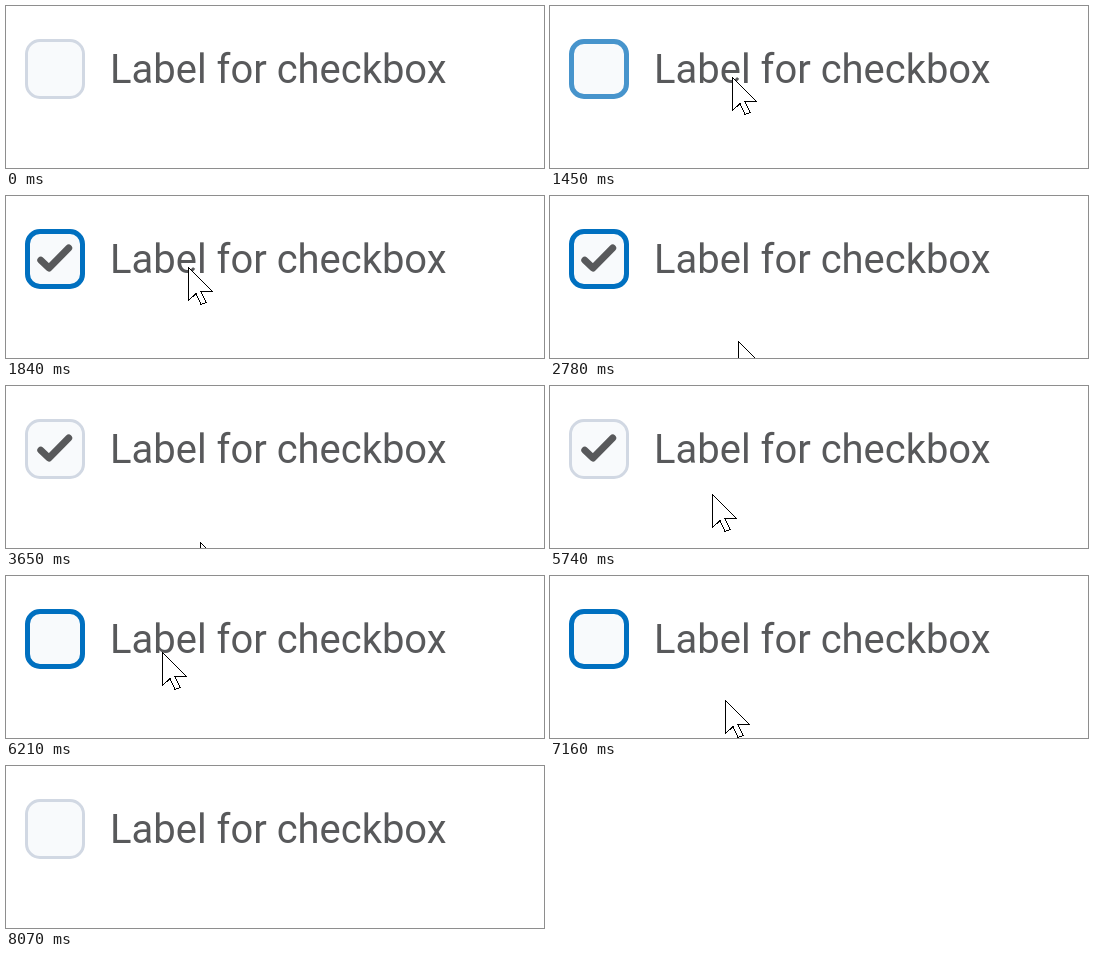
An HTML page that plays this animation: 538x162 px, repeating every 9860 ms.

```html
<!DOCTYPE html>
<html lang="en">
<head>
<meta charset="utf-8">
<title>Checkbox with label</title>
<style>
  html, body { margin: 0; width: 100%; height: 100%; overflow: hidden; background: #fff; }
  svg { display: block; }
  text { font: 39.95px Roboto, sans-serif; fill: #58595b; }
  #check { fill: none; stroke: #58595b; stroke-width: 7; stroke-linecap: round; stroke-linejoin: round; }
  #cursor { fill: #fff; stroke: #000; shape-rendering: crispEdges; }
</style>
</head>
<body>
<svg width="538" height="162" viewBox="0 0 538 162">
  <rect id="box" fill="#f8fafc"/>
  <path id="check" d="M34.8 64.2L43 72L62.7 52"/>
  <text x="104.1" y="77">Label for checkbox</text>
  <path id="cursor" d="M.5.5V33.5L8 26.5L13 37.5L18 35.5L13 24.5H24.5Z"/>
</svg>
<script>
const LOOP = 9860, FADE = 300;
const STEP = 1000 / 13, PHASE = 1070; // the picture advances 13 times a second
const GREY = [209, 216, 227], BLUE = [0, 112, 192], RADIUS = 15;
const [box, check, cursor] = ['box', 'check', 'cursor'].map(id => document.getElementById(id));

// Pointer glides; power is the ease-out strength along x and y
const glides = [
  { start: 1070, end: 1400, from: [219, 146], to: [182, 71], power: [1, 2] },
  { start: 2500, end: 2910, from: [182, 71], to: [194, 156], power: [0.7, 2] },
  { start: 5450, end: 5830, from: [196, 159], to: [156, 76], power: [2, 1] },
  { start: 6740, end: 7220, from: [156, 76], to: [179, 138], power: [1, 0.8] },
  { start: 7545, end: 7700, from: [179, 140], to: [179, 163], power: [1, 1] }
];
const visible = [[1070, 3950], [5450, 7700]];
const hovered = [[1330, 3300], [5690, 7745]];
const checked = [[1840, 6210]];

const mix = (a, b, p) => Math.round(a + (b - a) * p);
const progress = (t, start, end) => Math.min(1, Math.max(0, (t - start) / (end - start)));
const easeOut = (p, power) => 1 - (1 - p) ** power;
const within = (spans, t) => spans.some(([on, off]) => t >= on && t < off);
const snap = t => PHASE + Math.floor((t - PHASE) / STEP + 0.1) * STEP;

function pointerAt(t) {
  const { start, end, from, to, power } = glides.findLast(g => t >= g.start) || glides[0];
  const p = progress(t, start, end);
  return from.map((a, axis) => mix(a, to[axis], easeOut(p, power[axis])));
}

function hoverAt(t) {
  const fade = start => easeOut(progress(t, start, start + FADE), 2);
  return hovered.reduce((sum, [on, off]) => sum + fade(on) - fade(off), 0);
}

function setBorder(amount) {
  const width = amount > 0.01 ? 5 : 3, inset = width / 2;
  const attrs = {
    x: 19 + inset, y: 33 + inset, width: 60 - width, height: 60 - width,
    rx: RADIUS - inset, 'stroke-width': width,
    stroke: `rgb(${GREY.map((c, i) => mix(c, BLUE[i], amount))})`
  };
  for (const name in attrs) box.setAttribute(name, attrs[name]);
}

const show = (element, on) => { element.style.display = on ? '' : 'none'; };

function draw(now) {
  const time = now % LOOP, t = snap(time);
  setBorder(hoverAt(t));
  show(check, within(checked, time));
  show(cursor, within(visible, t));
  cursor.setAttribute('transform', `translate(${pointerAt(t)})`);
  requestAnimationFrame(draw);
}
draw(performance.now());
</script>
</body>
</html>
```
